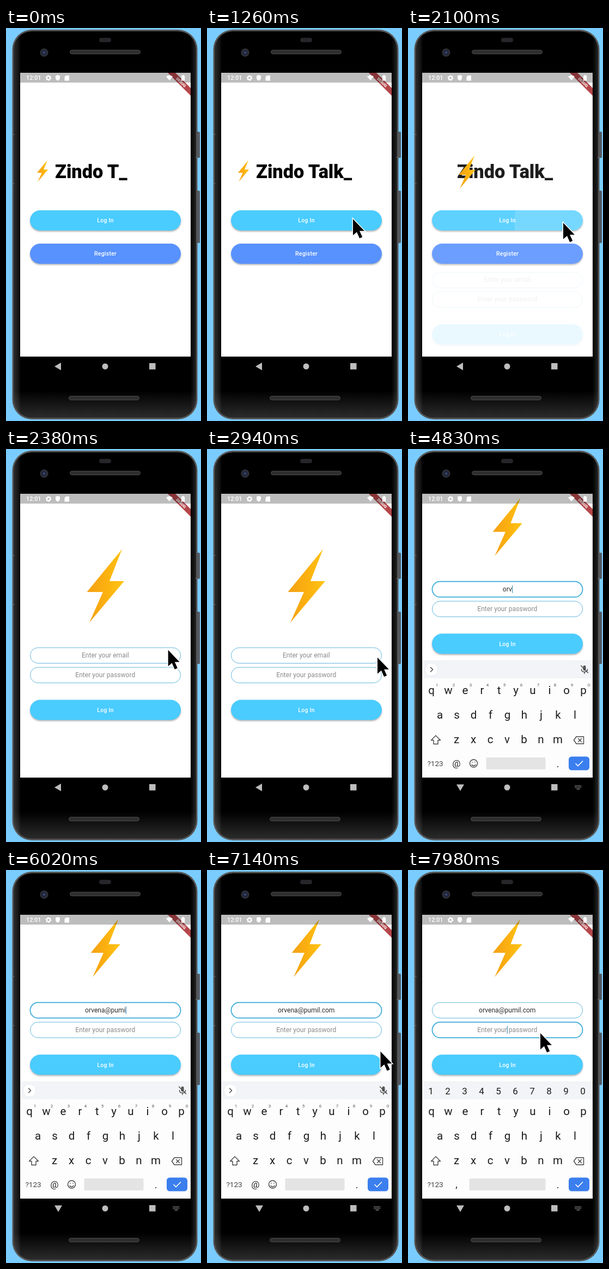
Recreate the animation shown at these times as an HTML page. Size 358 by 720 pixels, loop 8000 ms.

```html
<!DOCTYPE html>
<html lang="en">
<head>
<meta charset="utf-8">
<title>Phone login demo</title>
<style>
  html, body { margin: 0; width: 100%; height: 100%; overflow: hidden; background: #7accff; }
  svg { display: block; width: 358px; height: 720px; font-family: Roboto, sans-serif; }
  text { white-space: pre; }
  .mid { text-anchor: middle; }
  .button { filter: drop-shadow(0 2px 1.5px rgba(0, 0, 0, .3)); }
  .label { font-size: 10.5px; font-weight: 500; fill: #fff; letter-spacing: .25px; }
  .input { font-size: 12.1px; fill: #8b8b8b; }
  .icon { fill: none; stroke: #444; stroke-width: 1.4; stroke-linejoin: round; stroke-linecap: round; }
</style>
</head>
<body>
<svg viewBox="0 0 358 720">
  <defs>
    <linearGradient id="gold"><stop stop-color="#f4a014"/><stop offset=".5" stop-color="#fbb010"/><stop offset="1" stop-color="#ffc514"/></linearGradient>
    <linearGradient id="edge"><stop stop-color="#2c2c2c"/><stop offset=".025" stop-color="#161616"/><stop offset=".04"/><stop offset=".97"/><stop offset="1" stop-color="#242424"/></linearGradient>
    <linearGradient id="sheen" x2="0" y2="1"><stop offset=".93" stop-color="#fff" stop-opacity="0"/><stop offset="1" stop-color="#fff" stop-opacity=".17"/></linearGradient>
    <radialGradient id="lens"><stop stop-color="#4a5a8c"/><stop offset=".45" stop-color="#1c2238"/><stop offset="1" stop-color="#303238"/></radialGradient>
    <clipPath id="screen"><path d="M26 82H339V602H26Z"/></clipPath>
    <clipPath id="loginShape"><rect x="44" y="334" width="277" height="37" rx="18.5"/></clipPath>
  </defs>

  <rect width="358" height="720" fill="#7accff"/>
  <g fill="#555b61">
    <rect x="349" y="190" width="7" height="48" rx="2"/>
    <rect x="349" y="298" width="7" height="96" rx="2"/>
  </g>
  <rect x="11.5" y="3" width="340" height="714" rx="36" fill="#555"/>
  <rect x="14" y="6" width="335" height="708" rx="33.5" fill="url(#edge)"/>
  <rect x="14" y="6" width="335" height="708" rx="33.5" fill="url(#sheen)"/>
  <path d="M11.5 195h4M11.5 285h4M348 237h4" stroke="#777"/>
  <rect x="171" y="18" width="22" height="8" rx="4" fill="#25252a"/>
  <circle cx="70" cy="45" r="7" fill="url(#lens)" stroke="#3c3c40"/>
  <g fill="#2e2e2e" stroke="#484848">
    <rect x="117.5" y="40.5" width="129" height="7" rx="3.5"/>
    <rect x="115.5" y="674.5" width="129" height="7" rx="3.5"/>
  </g>

  <g clip-path="url(#screen)">
    <path d="M26 82H339V602H26Z" fill="#fff"/>
    <g id="welcome"></g>
    <g id="login"></g>
    <path id="bolt" d="M30.5-67.5L-34 11H-4.5L-29.5 67L34.5-9H7.5Z" fill="url(#gold)"/>
    <g id="keyboard"></g>
    <path d="M297 82H311L339 110V124Z" fill="#b4464a"/>
    <text class="mid" transform="translate(319.700 101.300) rotate(45)" font-size="7" font-weight="900" fill="#fff">DEBUG</text>
    <path d="M26 82H339V100H26Z" opacity=".26"/>
    <g fill="#fff">
      <text x="37" y="95.3" font-size="10.8" font-weight="500">12:01</text>
      <circle cx="78" cy="91.5" r="3.2" fill="none" stroke="#fff" stroke-width="2.2"/>
      <circle cx="78" cy="91.5" r="4.6" fill="none" stroke="#fff" stroke-width="1.4" stroke-dasharray="2.4 2.4"/>
      <path d="M95 86l4 1.6v3.4q0 4-4 5.5q-4-1.500-4-5.500v-3.400ZM110 87h6v9.500h-8.500v-7ZM294 89q6-5 12 0l-6 7ZM322 87.500h1.800v-1.500h2.600v1.500h1.800v9h-6.200Z"/>
    </g>
  </g>

  <g fill="#bdbdbd">
    <path id="back"/>
    <circle cx="182" cy="620" r="5.5"/>
    <path d="M263 614h11.500v11.500h-11.500Z"/>
    <g id="imeIcon" stroke="#bdbdbd" fill="none">
      <path d="M306.500 616.500h12M306.500 618.500h12M306.500 620.500h12" stroke-dasharray="1.300 1"/>
      <path d="M309.500 623h6"/>
    </g>
  </g>
  <path id="pointer" d="M0 0V32L7.500 25.500L13 38L18.500 35.500L13 23.500H22.500Z" stroke="#fff" stroke-width="3" paint-order="stroke"/>
</svg>

<script>
const LOOP = 8000;
const TITLE = 'Zindo Talk';
const EMAIL = 'orvena@pumil.com';
const CLICK = 1950, PAGE_START = 2012, PAGE_TIME = 300;
const EMAIL_FOCUS = 3450, KEYBOARD_IN = 3900, TYPE_START = 4450, KEY_TIME = 145;
const PASSWORD_FOCUS = 7600, KEYBOARD_SWAP = 7700;
// Each pointer path is a list of [time, x, y].
const POINTER_PATHS = [
  [[770, 360, 406], [1200, 268, 350], [1850, 268, 350], [2100, 285, 357],
   [2700, 313, 382], [3300, 313, 382], [3780, 338, 341], [3980, 360, 326]],
  [[6900, 360, 351], [7500, 243, 299], [LOOP, 243, 299]]
];

const $ = id => document.getElementById(id);
const clamp = v => Math.max(0, Math.min(1, v));
const progress = (t, start, time) => clamp((t - start) / time);
const mix = (a, b, p) => a + (b - a) * p;
const smooth = p => p * p * (3 - 2 * p);
const show = (id, on) => $(id).setAttribute('visibility', on ? 'visible' : 'hidden');
const place = (id, x, y, scale = 1) =>
  $(id).setAttribute('transform', `translate(${x} ${y}) scale(${scale})`);

// Cubic bezier (.4, 0, .2, 1), solved by bisection.
function fastOutSlowIn(x) {
  let low = 0, high = 1;
  for (let i = 0; i < 20; i++) {
    const u = (low + high) / 2, v = 1 - u;
    if (1.2 * u * v * v + .6 * u * u * v + u ** 3 < x) low = u; else high = u;
  }
  return smooth(low);
}

const text = (x, y, size, value, extra = '') =>
  `<text class="mid" x="${x}" y="${y}" font-size="${size}" ${extra}>${value}</text>`;
const button = (y, color, label) =>
  `<rect class="button" x="44" y="${y}" width="277" height="37" rx="18.5" fill="${color}"/>
   <text class="mid label" x="182.5" y="${y + 22.3}">${label}</text>`;
const field = (id, y) =>
  `<rect id="${id}Box" x="44.5" y="${y}" width="276" height="28.5" rx="14.25" fill="#fff" stroke="#64b7dc"/>
   <text id="${id}Text" class="mid input" x="182.3" y="${y + 18}"></text>
   <path id="${id}Caret" stroke="#3f8fb5" stroke-width="1.2"/>`;

$('welcome').innerHTML =
  `<text id="title" x="90" y="275" font-size="34.3" font-weight="900"></text>
   ${button(334, '#4accff', 'Log In')}${button(395, '#5892ff', 'Register')}
   <g clip-path="url(#loginShape)"><circle id="ripple" cx="284" cy="355" fill="#fff" opacity=".14"/></g>`;
$('login').innerHTML =
  `<path d="M26 82H339V901H26Z" fill="#fff"/>
   <g id="form">${field('email', 364)}${field('password', 400)}${button(459.5, '#4accff', 'Log In')}</g>`;

const keyRow = (keys, x, y, size, extra) =>
  [...keys].map((key, i) => text(x + 31 * i, y, size, key, extra)).join('');
$('keyboard').innerHTML =
  `<path d="M26 387H339V602H26Z" fill="#fdfdfe"/><path d="M26 387H339V420H26Z" fill="#f2f4f7"/>
   <g fill="#1b1b1b">
     ${keyRow('qwertyuiop', 43, 449, 20.5)}${keyRow('asdfghjkl', 58.5, 494, 20.5)}
     ${keyRow('zxcvbnm', 89, 539, 20.5)}${text(275, 583, 18, '.')}
   </g>
   ${text(50, 581, 13.5, '?123', 'fill="#444"')}
   <path class="icon" d="M51 525l8.500 8.500h-4.500v7h-8v-7h-4.500ZM309 527h13.500v13h-13.500l-4.500-6.500ZM312.500 530.500l6 6M318.500 530.500l-6 6"/>
   <rect x="295" y="563.5" width="38" height="25" rx="5.500" fill="#3b7eee"/>
   <path d="M307.500 576l4.500 4.500l9-9" fill="none" stroke="#fff" stroke-width="1.600"/>
   <g id="emailKeys">
     <circle cx="43" cy="404" r="12" fill="#fff" stroke="#e7e9ec"/>
     <path class="icon" d="M41.500 400l4 4l-4 4"/>
     <rect x="321.500" y="396.500" width="5" height="9.500" rx="2.500" fill="#555"/>
     <path class="icon" d="M318.500 403.500q0 5 5.500 5q5.500 0 5.500-5M324 408.500v3M317.500 397l13 13"/>
     ${keyRow('1234567890', 53, 435, 8, 'fill="#555"')}
     ${text(89, 582, 17, '@', 'fill="#222"')}
     <circle class="icon" cx="120.500" cy="576" r="7"/>
     <path class="icon" d="M117 578.500q3.500 4 7 0M118 573.500v.5M123 573.500v.5"/>
     <rect x="143.500" y="565" width="109" height="22" rx="2" fill="#e4e4e4"/>
   </g>
   <g id="passwordKeys">
     ${keyRow('1234567890', 42, 410.500, 17, 'fill="#1b1b1b"')}
     ${text(89, 582, 18, ',', 'fill="#222"')}
     <rect x="112.500" y="565" width="140" height="22" rx="2" fill="#e4e4e4"/>
   </g>`;

function drawField(id, value, hint, focused, caretOn) {
  const label = $(id + 'Text'), box = $(id + 'Box'), caret = $(id + 'Caret');
  label.textContent = value || hint;
  label.style.fill = value ? '#2b2b2b' : '#8b8b8b';
  box.setAttribute('stroke-width', focused ? 2 : 1);
  box.setAttribute('stroke', focused ? '#4fb4dc' : '#64b7dc');
  const x = 182.3 + (value ? label.getComputedTextLength() / 2 + .8 : 0);
  caret.setAttribute('d', focused && caretOn ? `M${x} ${+label.getAttribute('y') - 11}v14` : '');
}

function drawPointer(t) {
  const path = POINTER_PATHS.find(p => t >= p[0][0] && t < p.at(-1)[0]);
  show('pointer', path);
  if (!path) return;
  const next = path.findIndex(k => k[0] > t);
  const [t0, x0, y0] = path[next - 1], [t1, x1, y1] = path[next];
  const p = smooth(progress(t, t0, t1 - t0));
  place('pointer', mix(x0, x1, p), mix(y0, y1, p), .93);
}

function draw(t) {
  const page = progress(t, PAGE_START, PAGE_TIME), slide = fastOutSlowIn(page);
  const focused = t >= EMAIL_FOCUS;

  $('title').textContent = TITLE.slice(0, 7 + Math.floor(t / 160)) + '_';
  $('ripple').setAttribute('r', Math.max(0, t - CLICK) * .59);
  $('login').setAttribute('opacity', page ** 1.8);
  place('login', 0, 130 * (1 - slide));
  place('form', 0, focused ? -121.2 : 0);

  if (focused) place('bolt', 182.5, 143, .79);
  else place('bolt', mix(67, 182.5, slide),
    mix(262, 251, slide) + 26 * slide * (1 - slide), mix(.295, 1, slide ** 1.5));

  const typed = Math.max(0, Math.floor((t - TYPE_START) / KEY_TIME) + 1);
  const typing = typed > 0 && typed <= EMAIL.length;
  const onPassword = t >= PASSWORD_FOCUS;
  const blink = start => (t - start) % 1000 < 500;
  drawField('email', EMAIL.slice(0, typed), 'Enter your email',
    focused && !onPassword, typing || blink(EMAIL_FOCUS));
  drawField('password', '', 'Enter your password', onPassword, blink(PASSWORD_FOCUS));

  const rise = fastOutSlowIn(progress(t, KEYBOARD_IN, 200));
  place('keyboard', 0, 216 * (1 - rise));
  show('emailKeys', t < KEYBOARD_SWAP);
  show('passwordKeys', t >= KEYBOARD_SWAP);
  show('imeIcon', focused);
  $('back').setAttribute('d', focused ? 'M89 614.500h14l-7 12Z' : 'M101 613v14l-12-7Z');
  drawPointer(t);
}

const start = performance.now();
function frame() {
  draw((performance.now() - start) % LOOP);
  requestAnimationFrame(frame);
}
frame();
</script>
</body>
</html>
```
